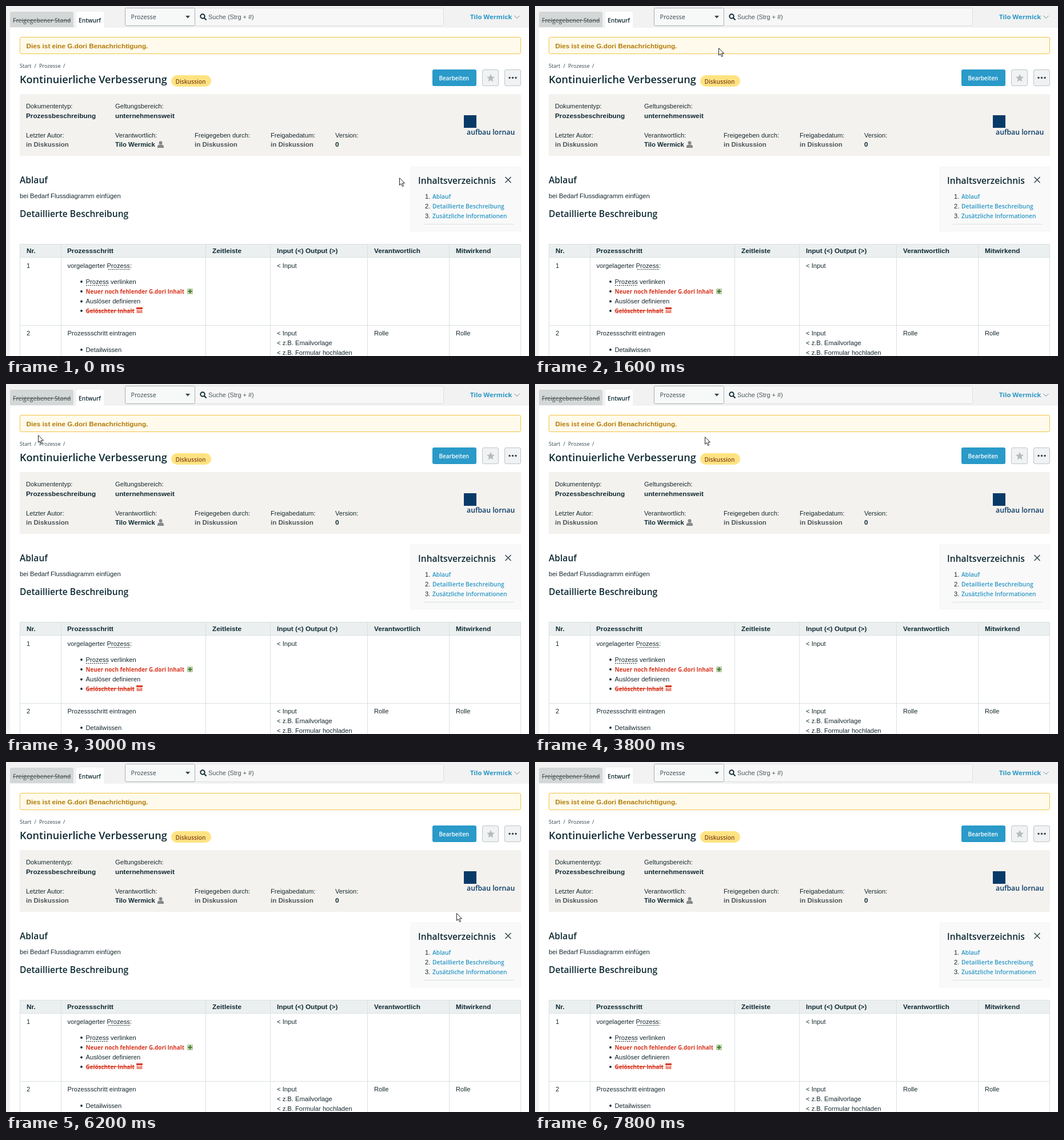
An HTML page for the animation above (8000 ms loop, 915x612 px).

```html
<!DOCTYPE html>
<html lang="de">
<head>
<meta charset="utf-8">
<title>Prozessbeschreibung</title>
<style>
html, body { margin: 0; width: 100%; height: 100%; overflow: hidden; background: #fff; }
svg { display: block; }
text { font: 11.2px "Liberation Sans", Arial, sans-serif; fill: #17292f; white-space: pre; }
.b { font-weight: 700; font-size: 11.75px; fill: #0f2a33; }
.g { font-weight: 700; font-size: 11.5px; fill: #4c5558; }
.s { font: 600 10.2px "Open Sans", "Noto Sans", sans-serif; fill: #0f2a33; }
.r { font-weight: 400; font-size: 10.7px; fill: #33454b; }
.c { font-weight: 400; font-size: 9.1px; fill: #33454b; }
.h1 { font-size: 18.1px; }
.h2 { font-size: 15.6px; }
.link { font-size: 10.3px; fill: #2a97c5; }
.red { font-weight: 700; font-size: 9.9px; fill: #d8361f; }
.del { text-decoration: line-through; }
.line { fill: none; stroke: #dae0e1; }
.dots { stroke: #17292f; stroke-dasharray: 2 1.5; }
</style>
</head>
<body>
<svg width="915" height="612" viewBox="0 0 915 612">
  <!-- top bar -->
  <path fill="#f2f2f2" d="M0 0h915v38H7v574H0z"/>
  <path fill="#d3d7d7" d="M7 37V13q0-3 3-3h105q3 0 3 3v24z"/>
  <path fill="#fff" d="M123 38V13q0-3 3-3h42q3 0 3 3v25z"/>
  <text class="s del" x="12" y="29" style="fill:#5d6466">Freigegebener Stand</text>
  <text class="s" x="127" y="29">Entwurf</text>
  <rect x="330.5" y="3.5" width="435" height="31" rx="2" fill="#f7f7f7" stroke="#dcdfe0"/>
  <rect x="208.5" y="3.5" width="122" height="31" rx="2" fill="#f7f8f8" stroke="#a7b1b4"/>
  <text class="s r" x="218.5" y="23">Prozesse</text>
  <path fill="#33454b" d="M314 17h8l-4 4.5z"/>
  <g fill="none" stroke="#0f2a33" stroke-width="2">
    <circle cx="344" cy="18" r="3.7"/><path d="M346.7 20.7l3.8 3.8"/>
  </g>
  <text x="354" y="23" style="font-size:10.9px;fill:#4c595d">Suche (Strg + #)</text>
  <text class="s link" x="812" y="23" style="font-weight:700;font-size:11.3px">Tilo Wermick</text>
  <path d="M889.5 17l4.5 4.5 4.5-4.5" fill="none" stroke="#75868c"/>

  <!-- notice and title -->
  <rect x="24.5" y="54.5" width="876" height="29" rx="2.5" fill="#fffaeb" stroke="#f2c344"/>
  <text class="b" x="35.5" y="73.5" style="fill:#b37c08">Dies ist eine G.dori Benachrichtigung.</text>
  <text class="s c" x="24" y="107.5">Start</text>
  <text class="s c" x="49.5" y="107.5">/</text>
  <text class="s c" x="58" y="107.5">Prozesse</text>
  <text class="s c" x="100" y="107.5">/</text>
  <text class="s h1" x="24" y="135">Kontinuierliche Verbesserung</text>
  <rect x="289" y="121" width="70" height="20" rx="10" fill="#ffe382"/>
  <text class="s" x="296.5" y="135.5" style="fill:#86461c">Diskussion</text>
  <rect x="746" y="111" width="77" height="29" rx="3" fill="#2a9ac9"/>
  <text class="s" x="757.5" y="130" style="font-size:9.9px;fill:#fff">Bearbeiten</text>
  <g fill="#f0f2f3" stroke="#bdc6c9">
    <rect x="833.5" y="111.5" width="28" height="28" rx="2.5"/>
    <rect x="872.5" y="111.5" width="28" height="28" rx="2.5"/>
  </g>
  <path fill="#b4babd" d="M848 119l2 4.5 4.8.5-3.6 3.3 1 4.9-4.2-2.5-4.2 2.5 1-4.9-3.6-3.3 4.8-.5z"/>
  <g fill="#33454b"><circle cx="881" cy="125.5" r="1.7"/><circle cx="886.5" cy="125.5" r="1.7"/><circle cx="892" cy="125.5" r="1.7"/></g>

  <!-- document facts -->
  <rect x="24" y="154" width="877" height="108" rx="2" fill="#f4f2ee"/>
  <text x="35" y="179">Dokumententyp:</text>
  <text x="191" y="179">Geltungsbereich:</text>
  <text class="b" x="35" y="196">Prozessbeschreibung</text>
  <text class="b" x="191" y="196">unternehmensweit</text>
  <text x="35" y="229.5">Letzter Autor:</text>
  <text x="191" y="229.5">Verantwortlich:</text>
  <text x="330" y="229.5">Freigegeben durch:</text>
  <text x="463" y="229.5">Freigabedatum:</text>
  <text x="576" y="229.5">Version:</text>
  <text class="g" x="35" y="246">in Diskussion</text>
  <text class="b" x="191" y="246" style="font-size:11.3px">Tilo Wermick</text>
  <text class="g" x="330" y="246">in Diskussion</text>
  <text class="g" x="463" y="246">in Diskussion</text>
  <text class="b" x="576" y="246">0</text>
  <path fill="#85898a" d="M265 248v-2q0-3.5 3.5-3.5h4q3.5 0 3.5 3.5v2z"/>
  <circle cx="270.5" cy="239.3" r="3" fill="#85898a"/>
  <rect x="801" y="191" width="22" height="22" fill="#083a68"/>
  <text class="s" x="806" y="225" style="font-size:12.3px;fill:#083a68">aufbau lornau</text>

  <!-- sections and contents -->
  <text class="s h2" x="24" y="309.5">Ablauf</text>
  <text x="24" y="336">bei Bedarf Flussdiagramm einfügen</text>
  <text class="s h2" x="24" y="368.5">Detaillierte Beschreibung</text>
  <rect x="708.5" y="281.5" width="192" height="112" fill="#f9f9f9" stroke="#f3f3f3"/>
  <text class="s h2" x="721" y="310.5">Inhaltsverzeichnis</text>
  <path d="M873.5 299l10 10m0-10l-10 10" stroke="#33454b" stroke-width="1.5"/>
  <text x="733" y="337">1.</text><text class="s link" x="746" y="337">Ablauf</text>
  <text x="733" y="354">2.</text><text class="s link" x="746" y="354">Detaillierte Beschreibung</text>
  <text x="733" y="371">3.</text><text class="s link" x="746" y="371">Zusätzliche Informationen</text>
  <path class="line" d="M731 381.5h157"/>

  <!-- table -->
  <rect x="24" y="416" width="877" height="24" fill="#ebefef"/>
  <path class="line" d="M24.5 612V416.5h876V612M24 439.5h877M24 558.5h877M96.5 416v196M349.5 416v196M462.5 416v196M632.5 416v196M775.5 416v196"/>
  <text class="b" x="36" y="432">Nr.</text>
  <text class="b" x="107" y="432">Prozessschritt</text>
  <text class="b" x="361" y="432">Zeitleiste</text>
  <text class="b" x="474" y="432">Input (&lt;) Output (&gt;)</text>
  <text class="b" x="644" y="432">Verantwortlich</text>
  <text class="b" x="787" y="432">Mitwirkend</text>
  <text x="36" y="457.5">1</text>
  <text x="107.5" y="457.5">vorgelagerter Prozess:</text>
  <text x="139.5" y="485.5">Prozess verlinken</text>
  <path class="dots" d="M179 460.5h39M140 488.5h39"/>
  <text class="s red" x="139.5" y="502.5">Neuer noch fehlender G.dori Inhalt</text>
  <text x="139.5" y="520">Auslöser definieren</text>
  <text class="s red del" x="139.5" y="536.5">Gelöschter Inhalt</text>
  <g fill="#17292f"><circle cx="132" cy="482" r="1.9"/><circle cx="132" cy="499" r="1.9"/><circle cx="132" cy="516.5" r="1.9"/><circle cx="132" cy="533" r="1.9"/><circle cx="132" cy="601" r="1.9"/></g>
  <rect x="317" y="494" width="10" height="10" rx="1" fill="#b9d2a8"/>
  <path d="M322 495.5v7m-3.5-3.5h7" stroke="#4b7a35" stroke-width="2"/>
  <path fill="#d8361f" d="M228 527h11v3h-11z"/>
  <path fill="#ec8b7d" d="M228.5 531h10v6h-10z"/>
  <path stroke="#fff" d="M231.5 532.5h4"/>
  <text x="474" y="457.5">&lt; Input</text>
  <text x="36" y="576">2</text>
  <text x="107.5" y="576">Prozessschritt eintragen</text>
  <text x="139.5" y="604.5">Detailwissen</text>
  <text x="474" y="576">&lt; Input</text>
  <text x="474" y="593">&lt; z.B. Emailvorlage</text>
  <text x="474" y="609.5">&lt; z.B. Formular hochladen</text>
  <text x="644" y="576">Rolle</text>
  <text x="787" y="576">Rolle</text>

  <path id="cursor" d="M.5.7v12.6l2.9-2.7 2.1 4.9 2.1-.9-2.1-4.8h4z" fill="#fff" stroke="#222" stroke-linejoin="round"/>
</svg>
<script>
const LOOP = 8000, TICK = 200;
// pointer waypoints: time, x, y
const path = [
  [600, 688, 300], [1000, 605, 238], [1600, 321, 73], [1800, 278, 65],
  [2000, 232, 54], [2600, 23, 84], [3000, 56, 89], [3400, 150, 97],
  [3800, 297, 92], [4000, 307, 85], [4200, 300, 75], [4800, 300, 75],
  [5000, 329, 91], [5400, 530, 178], [6000, 798, 271], [6200, 788, 264],
  [6400, 735, 253], [6600, 659, 290], [7200, 760, 412], [7600, 904, 365],
  [7800, 940, 350]
];
const cursor = document.getElementById("cursor");

// slope at a waypoint; zero where the direction turns
function slope(i, k) {
  const a = path[i - 1], b = path[i], c = path[i + 1];
  if (!a || !c || (b[k] - a[k]) * (c[k] - b[k]) <= 0) return 0;
  const p = (b[k] - a[k]) / (b[0] - a[0]), q = (c[k] - b[k]) / (c[0] - b[0]);
  return 2 * p * q / (p + q);
}

function at(t, k) {
  if (t <= path[0][0]) return path[0][k];
  const i = path.findIndex(p => p[0] >= t);
  if (i < 0) return path[path.length - 1][k];
  const a = path[i - 1], b = path[i], d = b[0] - a[0], u = (t - a[0]) / d, v = 1 - u;
  return v * v * (1 + 2 * u) * a[k] + u * u * (3 - 2 * u) * b[k]
    + d * u * v * (v * slope(i - 1, k) - u * slope(i, k));
}

function draw(now) {
  const t = Math.floor(now % LOOP / TICK) * TICK;
  cursor.setAttribute("transform", `translate(${Math.round(at(t, 1))} ${Math.round(at(t, 2))})`);
  requestAnimationFrame(draw);
}
draw(0);
</script>
</body>
</html>
```
